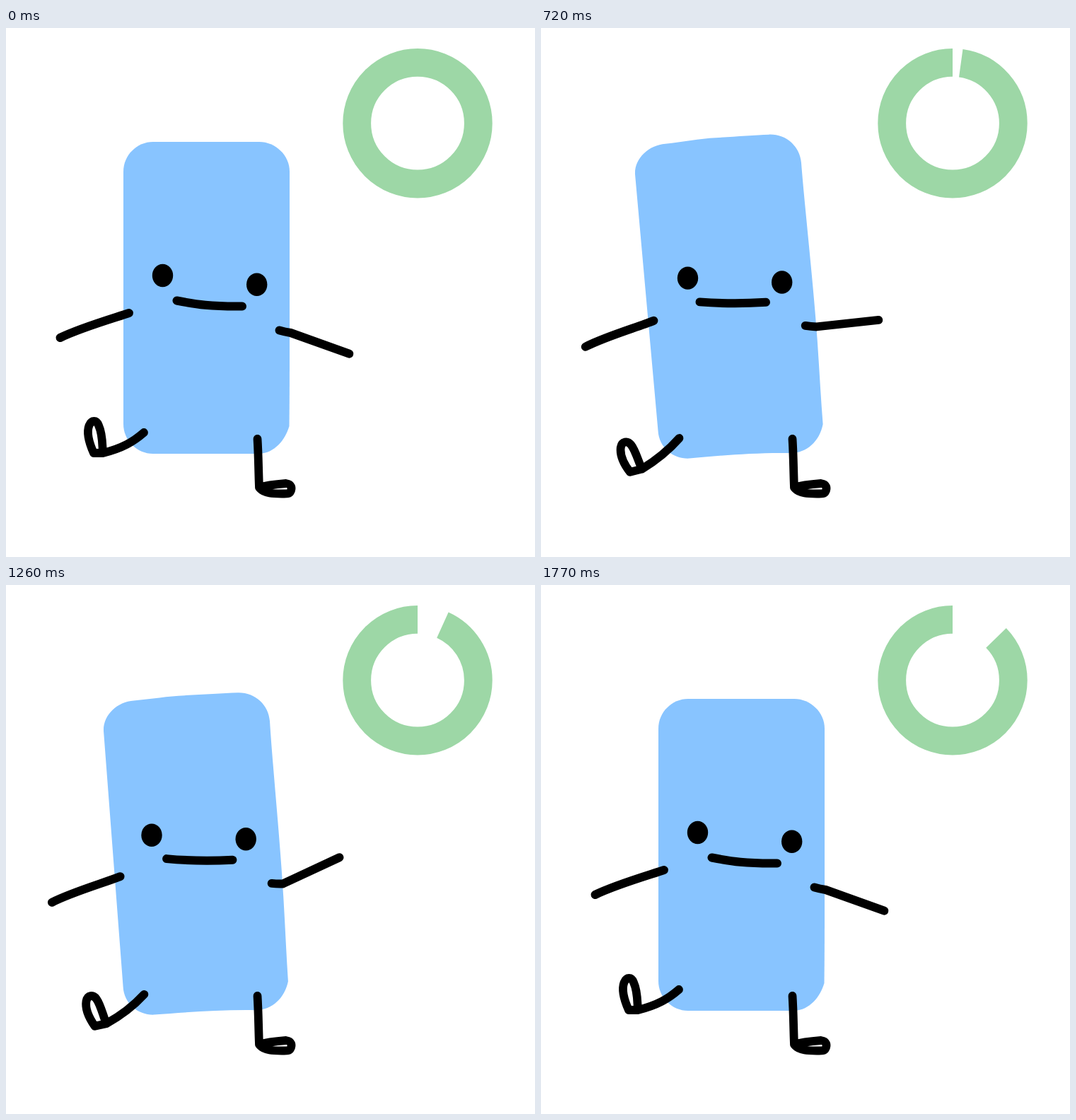
An HTML page that plays this animation: 748 by 748 pixels, repeating every 1800 ms.

```html
<!DOCTYPE html>
<html lang="en">
<head>
<meta charset="utf-8">
<title>Leaning block</title>
<style>
  html, body { margin: 0; width: 100%; height: 100%; overflow: hidden; background: #fff; }
  svg { display: block; width: 100%; height: 100%; }
  .line { fill: none; stroke: #000; stroke-width: 12; stroke-linecap: round; stroke-linejoin: round; }
  #foot, #leg { stroke-width: 11.8; }
</style>
</head>
<body>
<svg viewBox="0 0 748 748">
  <circle id="ring" cx="582" cy="134.7" r="85.8" pathLength="360" fill="none"
    stroke="#9dd7a6" stroke-width="39.8" transform="rotate(-90 582 134.7)"/>
  <path id="body" fill="#88c4ff"/>
  <g id="open">
    <ellipse id="eyeL" cx="221.5" rx="14.7" ry="16.2"/>
    <ellipse id="eyeR" cx="354.7" rx="14.7" ry="16.2"/>
  </g>
  <path id="shut" class="line" d="M190 351.5C198 361 211 363 220.500 355M322 358C331 367 343 367 352 358.500"/>
  <path id="mouth" class="line"/>
  <path id="armL" class="line"/>
  <path id="armR" class="line"/>
  <path id="foot" class="line"/>
  <path id="leg" class="line" d="M355.500 581C357 604 357 627 358 650C370 646 383 645 396 644C404 645 405 651 402 656C401 659 396 658.500 390 658.500C378 658.500 366 658.500 359 651"/>
</svg>
<script>
const LOOP = 1800, STEP = 30;
const $ = id => document.getElementById(id);
const set = (id, attrs) => {
  for (const name in attrs) $(id).setAttribute(name, attrs[name]);
};

// Each shape: upright pose, fully leaning pose
const poses = {
  body: [
    "M166 203C166 180 185 161 208 161C233 161 258 161 283 161C308 161 333 161 358 161C381 161 401 180 401 203C401 280 401 360 401 440C401 480 401 520 400.5 563C395 582 380 601 358 602C308 602 258 602 208 602C185 602 166 583 166 560Z",
    "M131 207C130 185 150 166 174 164C198 161.5 222 156 245 155C270 153 300 151 320 150C344 149 364 166 366 190C371 250 385 370 390 440C393 480 395 520 398.5 560C394 584 376 601 352 601C300 600 250 605 210 609C188 610 167 595 165.5 570Z"
  ],
  mouth: [
    "M241.5 385.5C270 391 290 394 334 393.5",
    "M223.5 387.5C255 389.7 285 389.7 317 387.5"
  ],
  armL: [
    "M174 403C150 411 105 424 76.5 438",
    "M158.5 414.5C135 424 90 437 62 451.5"
  ],
  foot: [
    "M195 572C180 585 165 594 137 601C136 590 137 575 131 562C128 554 121 554 117.5 562C113 574 119 590 124 601L137 601",
    "M195.500 580.5C182 596 165 611 143 625C137 612 133 598 127 591C122 585 114 586 112.5 595C111 608 120 622 126 629.5L143 625"
  ]
};

const times = [0, 420, 720, 930, 1260, 1560, 1770];
const keys = {
  lean: [0, .714, .943, 1, .8, .286, 0],
  eyeX: [0, -11.5, -14, -16, -15.5, -7.5, 0],
  eyeY: [0, 0, 3.6, 3.8, 3.8, 3.8, 0],
  wave: [19.7, 13, -6.2, -24.6, -25, 3.5, 19.7],
  elbow: [3.5, 4, 1.5, 0, .5, 1, 3.5]
};

// Smooth curve through the key values
function curve(v, t) {
  const last = times.length - 1;
  let i = 0;
  while (i < last - 1 && t > times[i + 1]) i++;
  const slope = n => {
    const a = Math.max(n - 1, 0), b = Math.min(n + 1, last);
    return (v[b] - v[a]) / (times[b] - times[a]);
  };
  const h = times[i + 1] - times[i];
  const u = Math.min((t - times[i]) / h, 1);
  const w = 1 - u;
  return v[i] * (1 + 2 * u) * w * w + slope(i) * h * u * w * w
    + v[i + 1] * u * u * (3 - 2 * u) - slope(i + 1) * h * u * u * w;
}

function blend([from, to], k) {
  const ends = to.match(/[\d.]+/g);
  let i = 0;
  return from.replace(/[\d.]+/g, n => (+n + (ends[i++] - n) * k).toFixed(2));
}

function draw(t) {
  const p = {};
  for (const name in keys) p[name] = curve(keys[name], t);

  for (const id in poses) set(id, { d: blend(poses[id], p.lean) });

  const s = t / 1000;
  const gap = s * s * (15.45 - 1.6 * (s - 1.05) ** 2);
  set("ring", { "stroke-dasharray": `${360 - gap} 360`, "stroke-dashoffset": -gap });

  const closed = t >= 870 && t < 1020;
  set("open", {
    transform: `translate(${p.eyeX} 0)`,
    visibility: closed ? "hidden" : "visible"
  });
  set("eyeL", { cy: 350 + p.eyeY });
  set("eyeR", { cy: 362.7 - p.eyeY * .9 });
  set("shut", {
    transform: `translate(${p.eyeX + 16} 0)`,
    visibility: closed ? "visible" : "hidden"
  });

  const x = 386.5 - 13.5 * p.lean, y = 427.5 - 7 * p.lean;
  const ex = x + 16, ey = y + p.elbow;
  const a = p.wave * Math.PI / 180;
  const tx = ex + 88 * Math.cos(a), ty = ey + 88 * Math.sin(a);
  set("armR", { d: `M${x} ${y}Q${x + 8} ${y + p.elbow / 2 + .5} ${ex} ${ey}L${tx} ${ty}` });
}

const start = performance.now();
function tick() {
  const t = (performance.now() - start) % LOOP;
  draw(Math.floor(t / STEP) * STEP);
  requestAnimationFrame(tick);
}
tick();
</script>
</body>
</html>
```
